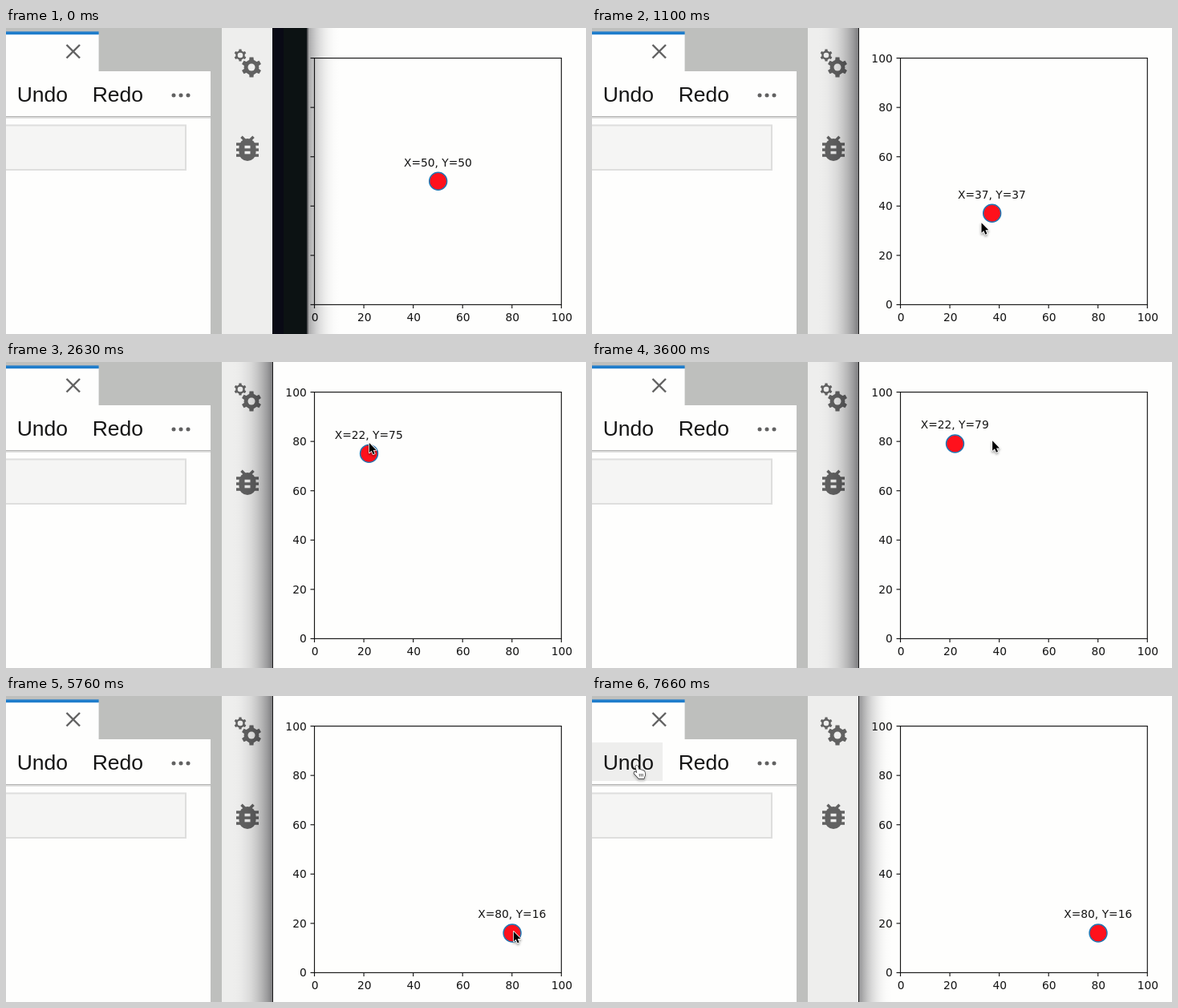
An HTML page with a canvas for the animation above (8 s loop, 723x382 px).

```html
<!DOCTYPE html>
<html lang="en">
<head>
<meta charset="utf-8">
<title>Draggable point</title>
<style>
html, body { margin: 0; width: 100%; height: 100%; overflow: hidden; background: #fefefd; }
canvas { display: block; }
</style>
</head>
<body>
<canvas width="723" height="382"></canvas>
<script>
const c = document.querySelector('canvas').getContext('2d');
const LOOP = 8000, ENTER = 130, RAISE_PLOT = 720, RAISE_EDITOR = 7630, LAG = 60;
const WHITE = '#fefefd', GREY = '#bebfbd', SIDE = '#eeeeed', ICON = '#616161', INK = '#151515';

// Pointer gestures: start, end, destination
const moves = [
  [130, 560, 538, 187], [870, 1450, 447, 294], [1600, 1800, 466, 294], [1800, 2030, 453, 294],
  [2190, 2670, 452, 99], [2920, 3030, 445, 97], [3230, 3300, 452, 99], [3480, 4160, 620, 96],
  [4460, 4700, 622, 102], [4910, 5590, 630, 292], [5740, 5760, 632, 294],
  [5930, 7060, 72, 104], [7190, 7420, 55, 87]
];
// Button press and release times
const drags = [[870, 1450], [2190, 2670], [3545, 4160], [4910, 5590]];

// Every gesture slows down towards its end; y trails x, which bends the path
function pointerAt(t) {
  let x = 598, y = 384;
  for (const [start, end, toX, toY] of moves) {
    if (t <= start) break;
    const e = Math.sin(Math.min(1, (t - start) / (end - start)) * Math.PI / 2);
    x += (toX - x) * e;
    y += (toY - y) * e ** 1.2;
  }
  return [x, y];
}

const STEP = 3.078;
const px = v => 384.5 + v * STEP;
const py = v => 345.4 - v * STEP;

// The point copies the pointer while it is dragged, a little late
function pointAt(t) {
  const s = t - LAG;
  const [press, release] = drags.findLast(d => d[0] <= s) || drags[0];
  const [x, y] = pointerAt(Math.max(press, Math.min(s, release)));
  return [Math.round((x - 383.5) / STEP), Math.round((341.4 - y) / STEP)];
}

function rect(color, x, y, w, h) {
  c.fillStyle = color;
  c.fillRect(x, y, w, h);
}

function disc(color, x, y, r) {
  c.fillStyle = color;
  c.beginPath();
  c.arc(x, y, r, 0, 7);
  c.fill();
}

function line(x1, y1, x2, y2) {
  c.beginPath();
  c.moveTo(x1, y1);
  c.lineTo(x2, y2);
  c.stroke();
}

function text(s, x, y, align, font) {
  c.font = font;
  c.textAlign = align;
  c.fillStyle = INK;
  c.fillText(s, x, y);
}

// Shadow that fades from x1 to x2
function shade(x1, x2, strength) {
  const g = c.createLinearGradient(x1, 0, x2, 0);
  for (let p = 0; p <= 1; p += .125) g.addColorStop(p, `rgba(0,0,6,${strength * (1 - p) ** 2.3})`);
  rect(g, Math.min(x1, x2), 0, Math.abs(x2 - x1), 382);
}

function gear(x, y, r, hole) {
  for (let i = 0; i < 6; i++) {
    c.save();
    c.translate(x, y);
    c.rotate(i * Math.PI / 3);
    c.fillStyle = ICON;
    c.beginPath();
    c.moveTo(-r * .3, 0);
    c.lineTo(-r * .2, -r);
    c.lineTo(r * .2, -r);
    c.lineTo(r * .3, 0);
    c.fill();
    c.restore();
  }
  disc(ICON, x, y, r * .76);
  disc(SIDE, x, y, hole);
}

function bug(x, y) {
  c.save();
  c.translate(x, y);
  c.scale(1.75, 1.75);
  c.strokeStyle = ICON;
  c.lineWidth = 2;
  for (const side of [-1, 1]) line(side * 4.3, -8.3, side * 1.5, -5.5);
  c.fillStyle = ICON;
  c.beginPath();
  c.roundRect(-6, -7, 12, 16, 6);
  c.fill();
  for (const v of [-4, 0, 4]) rect(ICON, -8, v, 16, 2);
  for (const v of [-2, 2]) rect(SIDE, -2, v, 4, 2);
  c.restore();
}

function editor(hover) {
  rect(GREY, 0, 0, 269, 382);
  rect(WHITE, 0, 8, 115.6, 46);
  rect('#1f7dcb', 0, 4.4, 115.6, 3.8);
  rect(WHITE, 0, 54, 255, 328);
  if (hover) rect(SIDE, 0, 58, 88, 48);
  rect('#b4b4b3', 0, 110, 255, 1.5);
  rect('#dededd', 0, 111.5, 255, 1.5);
  c.strokeStyle = ICON;
  c.lineWidth = 2.4;
  line(75.5, 21, 92, 37.5);
  line(92, 21, 75.5, 37.5);
  const font = '26.5px "Liberation Sans", Arial, sans-serif';
  text('Undo', 13.7, 92, 'left', font);
  text('Redo', 107.7, 92, 'left', font);
  for (const x of [209, 218, 227]) disc(ICON, x, 84, 2.5);
  rect('#dededd', 0, 120.5, 225, 57.5);
  rect('#f5f5f4', 0, 122.5, 223, 53.5);
  rect(SIDE, 269, 0, 63, 382);
  gear(306, 49, 12.4, 4.5);
  gear(292, 34, 7.6, 3.3);
  bug(301, 150.3);
}

function plot(t) {
  const font = '13.8px "DejaVu Sans", sans-serif';
  rect(WHITE, 332, 0, 391, 382);
  c.strokeStyle = INK;
  c.lineWidth = 1.15;
  c.strokeRect(px(0), py(100), 100 * STEP, 100 * STEP);
  for (let v = 0; v <= 100; v += 20) {
    const x = px(v), y = py(v);
    line(x, py(0), x, 350);
    line(379.5, y, px(0), y);
    text(v, x + .6, 366, 'center', font);
    text(v, 374.7, y + 5, 'right', font);
  }
  const [vx, vy] = pointAt(t), x = px(vx), y = py(vy);
  disc('#ff111c', x + .3, y - .2, 11);
  c.strokeStyle = '#1f77b4';
  c.lineWidth = 1.4;
  c.stroke();
  text(`X=${vx}, Y=${vy}`, x, y - 18.9, 'center', font);
}

function windowEdges(t) {
  if (t < RAISE_PLOT) {
    rect('#090a15', 332, 0, 14, 382);
    rect('#0c1213', 346, 0, 29, 382);
    rect('#555558', 375, 0, 1.5, 382);
    shade(376, 418, .36);
    return;
  }
  if (t < RAISE_EDITOR) shade(332, 280, .47);
  else shade(333, 376, .42);
  rect('#1a1a1a', 332, 0, 1, 382);
}

const arrow = new Path2D('M0 0V15L3.4 11.8 5.8 17.3 8.3 16.2 5.9 10.9H10.6Z');
const hand = new Path2D('M-1.6 1Q0-1.4 1.5 1L2.7 5Q4.2 4 5.2 5.6 6.8 4.6 7.8 6.4 9.6 5.8 10 8L10.4 11.5 9 16H2.4L-3.4 9.6Q-3.6 7.4-1.6 7.8L.4 9.2Z');

function pointer(x, y, isHand) {
  const shape = isHand ? hand : arrow;
  c.save();
  c.translate(x + .8, y);
  if (!isHand) c.scale(.83, .83);
  c.lineJoin = 'round';
  c.shadowColor = 'rgba(0,0,0,.4)';
  c.shadowBlur = 3;
  c.shadowOffsetY = 2;
  c.strokeStyle = isHand ? '#222' : '#fff';
  c.lineWidth = isHand ? 1.3 : 2;
  c.stroke(shape);
  c.shadowColor = 'transparent';
  c.fillStyle = isHand ? '#fff' : '#000';
  c.fill(shape);
  if (isHand) {
    c.strokeStyle = '#333';
    c.lineWidth = .8;
    for (const k of [3.3, 5.3, 7.3]) line(k, 10, k + .3, 13.5);
  }
  c.restore();
}

function draw(now) {
  const t = now % LOOP, [x, y] = pointerAt(t);
  const hover = x < 88 && y > 58 && y < 103;
  editor(hover);
  plot(t);
  windowEdges(t);
  if (t >= ENTER) pointer(x, y, hover);
  requestAnimationFrame(draw);
}
requestAnimationFrame(draw);
</script>
</body>
</html>
```
